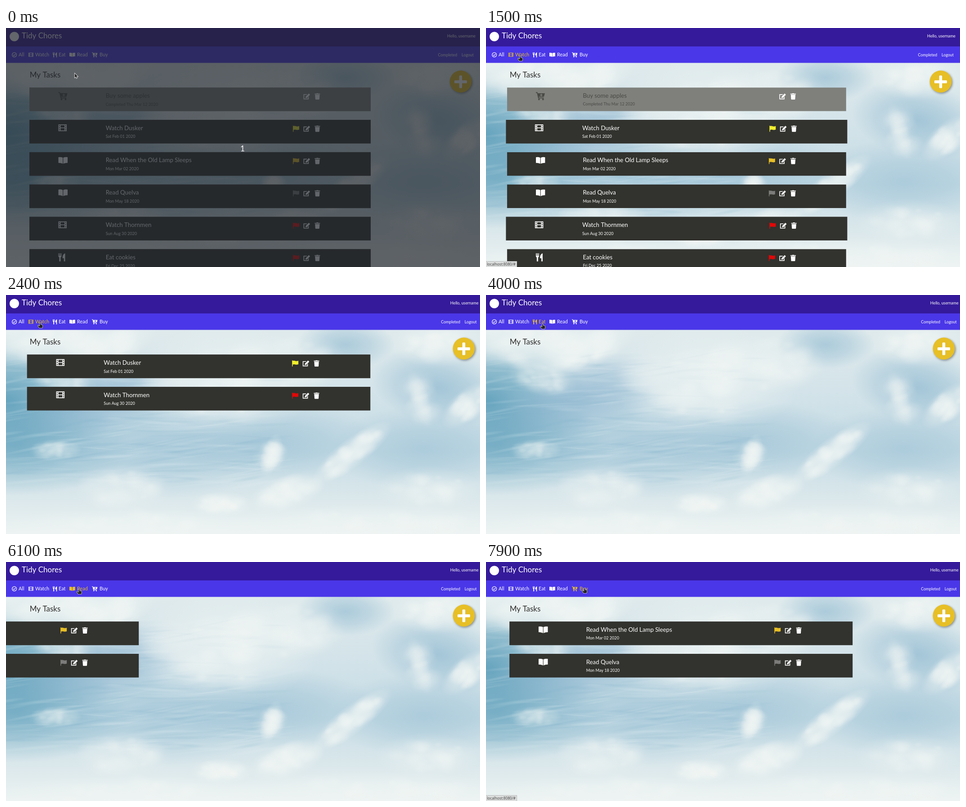
An HTML page with a canvas for the animation above (8000 ms loop, 1054 by 531 pixels).

```html
<!DOCTYPE html>
<html lang="en">
<head>
<meta charset="utf-8">
<title>Tasks</title>
<style>
html, body { margin: 0; width: 100%; height: 100%; overflow: hidden; }
canvas { display: block; width: 100%; height: 100%; }
</style>
</head>
<body>
<canvas id="stage" width="1054" height="531"></canvas>
<script>
const W = 1054, H = 531, LOOP = 8000;
const YELLOW = '#e7bf26', DARK = '#32322e';
const canvas = document.getElementById('stage');
const ctx = canvas.getContext('2d');

const ICONS = {
  All: 'M0 5.5a5.5 5.5 0 1 0 11 0a5.5 5.5 0 1 0-11 0zM1.2 5.5a4.3 4.3 0 1 0 8.6 0a4.3 4.3 0 1 0-8.6 0zM4.7 8.2L2.4 5.9l.9-.9 1.4 1.4 3-3 .9.9z',
  Watch: 'M0 0h18.5v15H0zM1.5 2h2v2.2h-2zM1.5 6.4h2v2.2h-2zM1.5 10.8h2V13h-2zM15 2h2v2.2h-2zM15 6.4h2v2.2h-2zM15 10.8h2V13h-2zM5 1.7h8.5v5H5zM5 8.3h8.5v5H5z',
  Eat: 'M0 0h1.4v5.5h1.2V0h1.6v5.5h1.2V0h1.4v6.5q0 2-1.8 2.6V18H1.9V9.1Q0 8.5 0 6.5zM15 0V18h-2.8v-7H9Q9 2 15 0z',
  Read: 'M0 1Q5 0 9.7 2V15.5Q5 13.2 0 13.6zM10.8 2Q15.5 0 20.5 1V13.6Q15.5 13.2 10.8 15.5z',
  Buy: 'M0 0h3.5l.6 2.3H20l-2 8H6.5l.4 1.7H17.5v1.7H5L2.3 1.8H0zM11 3.6h1.8v2h2v1.6h-2v2h-1.8v-2h-2v-1.6h2zM5 16a1.9 1.9 0 1 0 3.8 0a1.9 1.9 0 1 0-3.8 0zM14 16a1.9 1.9 0 1 0 3.8 0a1.9 1.9 0 1 0-3.8 0z',
  flag: 'M0 0h1.4v13.5H0zM1.4 1Q4 .1 7 1.2T14 .8V8.8Q10.5 10.2 7.5 9.2T1.4 9.4z',
  edit: 'M1.5 1.8H8.4L6.8 3.4H1.8v8.2h8.4V8.6l1.6-1.6V13.2H.2V1.8zM4.6 10.2l.5-3L12 .3l2.8 2.8-6.9 6.9z',
  trash: 'M0 .8h3.6L4.3 0h3.4l.7.8H12v1.7H0zM.8 3.4h10.4l-.7 9.6q-.1 1-1 1H2.5q-.9 0-1-1z',
  arrow: 'M0 0V9.2L2.1 7.3 3.6 10.6 5.1 9.9 3.6 6.7H6.6z',
  hand: 'M-1 1Q0-.6 1 1V4.3H4Q5.3 4.4 5.3 6V8.5Q5 10 4.4 11H-1.8Q-3.6 9-5 6.4-4.4 5-2.8 6.3L-1 7.4z'
};
for (const name in ICONS) ICONS[name] = new Path2D(ICONS[name]);

const NAV = [
  { kind: 'All', x: 13, textX: 28, left: 8, right: 45, scale: 1, y: 54 },
  { kind: 'Watch', x: 50, textX: 65, left: 45, right: 100, scale: .58, y: 55 },
  { kind: 'Eat', x: 104, textX: 117, left: 99, right: 137, scale: .62, y: 54 },
  { kind: 'Read', x: 141, textX: 158, left: 136, right: 186, scale: .62, y: 54.5 },
  { kind: 'Buy', x: 191, textX: 208, left: 187, right: 230, scale: .62, y: 54 }
];
const TASKS = [
  { kind: 'Buy', title: 'Buy some apples', date: 'Completed Thu Mar 12 2020', done: true },
  { kind: 'Watch', title: 'Watch Dusker', date: 'Sat Feb 01 2020', flag: '#f0ee2e' },
  { kind: 'Read', title: 'Read When the Old Lamp Sleeps', date: 'Mon Mar 02 2020', flag: YELLOW },
  { kind: 'Read', title: 'Read Quelva', date: 'Mon May 18 2020', flag: '#7c7c7a' },
  { kind: 'Watch', title: 'Watch Thornmen', date: 'Sun Aug 30 2020', flag: '#e00808' },
  { kind: 'Eat', title: 'Eat cookies', date: 'Fri Dec 25 2020', flag: '#e00808' }
];
const VIEWS = [
  { kind: 'All', enter: -1000, exit: 1430 },
  { kind: 'Watch', enter: 2037, exit: 3460 },
  { kind: 'Eat', enter: 4125, exit: 5400 },
  { kind: 'Read', enter: 6040, exit: 7870 },
  { kind: 'Buy', enter: 9000, exit: 9999 }
];
// The picture only refreshes inside these spans and holds between them.
const REFRESH = [[0, 0], [500, 1000], [1300, 1300], [1500, 1800], [2000, 3100], [3300, 3300],
  [3500, 3700], [4000, 4000], [4200, 4500], [4900, 5200], [5400, 5800], [6000, 7500],
  [7700, 7700], [7900, 7900]];
const STATUS = [[1300, 2000], [3300, 4000], [5400, 5800], [7700, LOOP]];
const POINTER = [[0, 153, 101], [500, 153, 101], [1000, 76, 62], [2400, 76, 62], [2800, 111, 59],
  [3100, 126, 64], [4800, 126, 64], [5200, 160, 58], [6000, 160, 58], [6600, 195, 89],
  [6900, 195, 89], [7500, 219, 58], [LOOP, 219, 58]];

const clamp = v => Math.max(0, Math.min(1, v));

function text(str, x, y, size, color = '#fff', align = 'left', family = 'Lato') {
  ctx.font = `${size}px ${family}, sans-serif`;
  ctx.fillStyle = color;
  ctx.textAlign = align;
  ctx.fillText(str, x, y);
}

function icon(name, x, y, color = '#fff', scale = 1, outline) {
  ctx.save();
  ctx.translate(x, y);
  ctx.scale(scale, scale);
  if (outline) {
    ctx.strokeStyle = outline;
    ctx.lineWidth = 1.6;
    ctx.stroke(ICONS[name]);
  }
  ctx.fillStyle = color;
  ctx.fill(ICONS[name], 'evenodd');
  ctx.restore();
}

function box(x, y, w, h, color) {
  ctx.fillStyle = color;
  ctx.fillRect(x, y, w, h);
}

function paintSky() {
  const sky = document.createElement('canvas');
  sky.width = W;
  sky.height = H;
  const c = sky.getContext('2d');
  let seed = 7;
  const random = () => (seed = seed * 16807 % 2147483647) / 2147483647;

  const base = c.createLinearGradient(0, 77, 0, H);
  [[0, '#dfeaec'], [.3, '#d3e3e9'], [.6, '#c6dce5'], [.85, '#dde9ec'], [1, '#edf3f2']]
    .forEach(([at, color]) => base.addColorStop(at, color));
  c.fillStyle = base;
  c.fillRect(0, 0, W, H);

  function puff(x, y, rx, ry, rgb, alpha, turn = 0) {
    c.save();
    c.translate(x, y);
    c.rotate(turn);
    c.scale(rx, ry);
    const g = c.createRadialGradient(0, 0, 0, 0, 0, 1);
    g.addColorStop(0, `rgba(${rgb},${alpha})`);
    g.addColorStop(.5, `rgba(${rgb},${alpha * .6})`);
    g.addColorStop(1, `rgba(${rgb},0)`);
    c.fillStyle = g;
    c.fillRect(-1, -1, 2, 2);
    c.restore();
  }
  function cloud(x, y, rx, ry, alpha, turn = 0) {
    puff(x, y, rx, ry, '238,244,243', alpha, turn);
    for (let i = 0; i < 22; i++) {
      const a = random() * 6.28, d = Math.sqrt(random()) * .65;
      const dx = Math.cos(a) * d * rx, dy = Math.sin(a) * d * ry, r = 6 + random() * ry * .35;
      puff(x + dx * Math.cos(turn) - dy * Math.sin(turn), y + dx * Math.sin(turn) + dy * Math.cos(turn),
        r * 1.5, r, '242,246,244', alpha * .4, turn);
    }
  }

  const blue = '102,164,190', pale = '151,190,211';
  puff(0, 235, 240, 160, blue, 1, .15);
  puff(20, 335, 260, 110, blue, .65);
  puff(220, 225, 210, 85, '140,180,207', .75, -.25);
  puff(330, 335, 290, 120, pale, .6);
  puff(590, 325, 240, 90, pale, .6);
  puff(960, 205, 150, 85, pale, .8, .2);
  puff(755, 110, 110, 55, pale, .7);
  puff(930, 340, 210, 95, pale, .55);

  for (let i = 0; i < 260; i++) {
    const x = random() * 600, y = 130 + random() * 290;
    puff(x, y, 30 + random() * 70, 1.5 + random() * 4, random() < .6 ? '232,241,243' : '125,176,201',
      .08 + random() * .12, -.22 + random() * .3);
  }

  cloud(80, 105, 210, 60, .85);
  cloud(215, 120, 130, 48, .75, -.4);
  cloud(125, 185, 80, 40, .5, .2);
  cloud(490, 190, 210, 125, .75);
  cloud(640, 150, 120, 70, .5);
  cloud(960, 110, 110, 50, .75);
  cloud(1025, 245, 70, 35, .75, -.7);
  cloud(920, 230, 20, 70, .4, -.3);
  cloud(770, 350, 110, 32, .9, -.65);
  cloud(590, 355, 22, 50, .65, .3);
  cloud(480, 465, 70, 28, .85);
  cloud(625, 440, 90, 40, .8, -.3);
  cloud(260, 430, 110, 55, .5);
  cloud(110, 345, 60, 25, .4);
  cloud(940, 430, 120, 50, .5);
  cloud(290, 515, 320, 40, .7);
  cloud(800, 515, 340, 50, .7);
  return sky;
}

function drawRow(task, index, wide, move, scale) {
  const left = wide ? 52.5 : 52, width = wide ? 763.5 : 759, top = 132.2 + 71.8 * index;
  const ink = task.done ? '#494946' : '#fff';
  ctx.save();
  ctx.translate(left + width / 2 + move, top + 26.3);
  ctx.scale(scale, scale);
  ctx.translate(-width / 2, -26.3);
  box(0, 0, width, 52.6, task.done ? '#7f807c' : DARK);
  icon(task.kind, width * .085, task.kind === 'Eat' ? 9.3 : 10.3, ink);
  text(task.title, width * .2235, 22.5, 13.3, ink);
  text(task.date, width * .2235, 40.3, 9.1, ink);
  const actions = width * .772;
  if (task.flag) icon('flag', actions, 13, task.flag);
  icon('edit', actions + 23.4, 13);
  icon('trash', actions + 48.4, 12.7);
  ctx.restore();
}

function drawList(t, wide) {
  const now = VIEWS.findIndex(v => t < v.exit + 370);
  const view = VIEWS[now], next = VIEWS[now + 1];
  if (!view || t < view.enter) return;
  const enter = clamp((t - view.enter) / 450);
  const out = clamp((t - view.exit) / 370) ** 3;
  const move = -800 * (1 - enter) ** 3 - 1130 * out;
  TASKS.filter(task => view.kind === 'All' || task.kind === view.kind).forEach((task, i) =>
    drawRow(task, i, wide, move, next && task.kind !== next.kind ? 1 - out : 1));
}

function drawHeader(t, wide, hovered) {
  const shift = wide ? 6.7 : 0;
  box(0, 0, W, 41, '#351a9b');
  box(0, 41, W, 36.5, '#4a37e8');
  ctx.fillStyle = '#fff';
  ctx.beginPath();
  ctx.arc(18.5, 19, 10.5, 0, 7);
  ctx.fill();
  text('Tidy Chores', 35, 22.7, 17);
  text('Hello, username', 1044 + shift, 21, 8.9, '#fff', 'right');
  text('Completed', 960.5 + shift, 62.5, 8.9);
  text('Logout', 1013 + shift, 62.5, 8.9);

  const clicked = VIEWS.filter((v, i) => i && VIEWS[i - 1].exit <= t).pop();
  for (const item of NAV) {
    const color = item === hovered ? YELLOW : '#fff';
    icon(item.kind, item.x, item.y, color, item.scale);
    text(item.kind, item.textX, 63.3, 10.9, color);
    if (clicked && clicked.kind === item.kind && item !== hovered) {
      ctx.strokeStyle = '#9d94e8';
      ctx.lineWidth = 1;
      ctx.strokeRect(item.left + .5, 46.5, item.right - item.left - 1, 25);
    }
  }
}

function drawAddButton(wide) {
  const x = wide ? 1018 : 1011, y = 119;
  ctx.save();
  ctx.shadowColor = 'rgba(0,0,0,.4)';
  ctx.shadowBlur = 5;
  ctx.shadowOffsetX = ctx.shadowOffsetY = 2;
  ctx.fillStyle = YELLOW;
  ctx.beginPath();
  ctx.arc(x, y, 24.4, 0, 7);
  ctx.fill();
  ctx.restore();
  ctx.fillStyle = '#fff';
  ctx.beginPath();
  ctx.roundRect(x - 14, y - 2.7, 28, 6.4, 1.5);
  ctx.roundRect(x - 3.2, y - 13.5, 6.4, 28, 1.5);
  ctx.fill();
}

function pointerAt(t) {
  const i = POINTER.findIndex(p => p[0] > t);
  const [t0, x0, y0] = POINTER[i - 1], [t1, x1, y1] = POINTER[i];
  const u = (t - t0) / (t1 - t0), s = u * u * (3 - 2 * u);
  return { x: x0 + (x1 - x0) * s, y: y0 + (y1 - y0) * s };
}

function refreshTime(ms) {
  const [, end] = REFRESH.filter(span => span[0] <= ms).pop();
  return Math.min(Math.floor(ms / 100) * 100, end);
}

const sky = paintSky();

function draw(t) {
  const wide = t >= 2000;
  const pointer = pointerAt(t);
  const hovered = NAV.find(n => pointer.x > n.left && pointer.x < n.right && pointer.y > 46 && pointer.y < 72);

  ctx.drawImage(sky, 0, 0);
  drawHeader(t, wide, hovered);
  text('My Tasks', 52.7, 110, 17, '#2c2c2a');
  drawList(t, wide);
  drawAddButton(wide);

  if (STATUS.some(([on, off]) => t >= on && t < off)) {
    box(0, 518, 69, 13, '#b9bcbc');
    box(0, 519, 68, 12, '#dcdedd');
    text('localhost:8080/#', 2, 528, 8.2, '#444', 'left', '"Noto Sans"');
  }
  if (t < 500) {
    box(0, 0, W, H, 'rgba(33,37,44,.7)');
    text('1', 526, 273.5, 17, '#fff', 'center');
  }
  icon(hovered ? 'hand' : 'arrow', pointer.x, pointer.y, '#242424', 1, hovered ? '#d8d3b0' : '#eee');
}

const start = performance.now();
function tick() {
  draw(refreshTime((performance.now() - start) % LOOP));
  requestAnimationFrame(tick);
}
tick();
</script>
</body>
</html>
```
